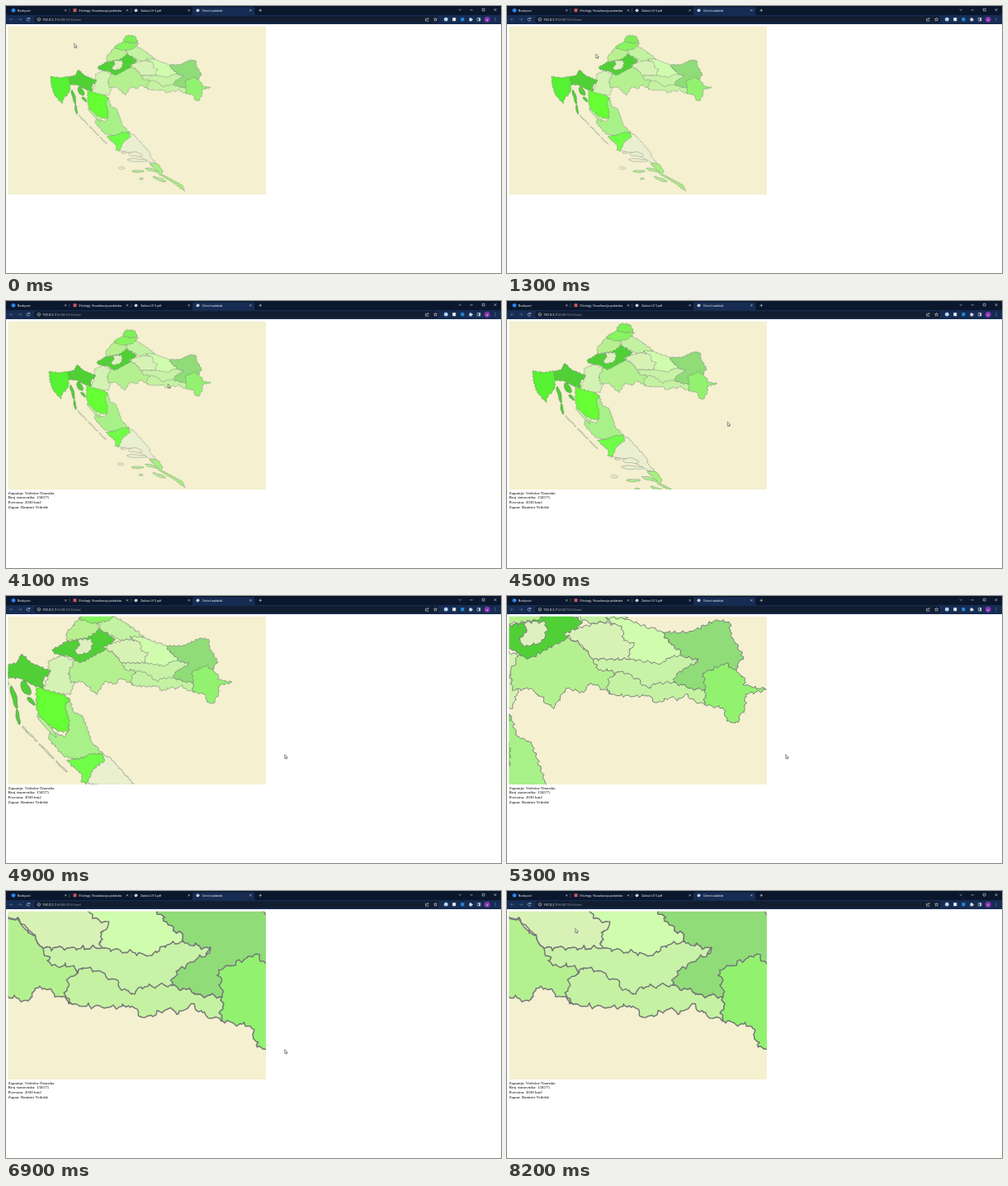
Write an HTML page that moves like this. It is 600 px wide and 323 px high and loops after 8300 ms.

```html
<!DOCTYPE html>
<html lang="hr">
<head>
<meta charset="utf-8">
<title>Cetvrti zadatak</title>
<style>
  html, body { margin: 0; width: 100%; height: 100%; overflow: hidden; background: #fff; }
  svg { display: block; width: 100%; height: 100%; }
  .ui { font: 3.65px Roboto, "Open Sans", sans-serif; fill: #eef2f8; }
  .page { font: 5px "Liberation Serif", Times, serif; fill: #000; }
  .icon { fill: none; stroke: #d5dbe6; stroke-width: .6; }
  .dim { opacity: .4; }
</style>
</head>
<body>
<svg viewBox="0 0 600 323" preserveAspectRatio="none">
  <defs><clipPath id="frame"><rect x="2.5" y="24.8" width="312.5" height="203.2"/></clipPath></defs>
  <rect width="600" height="323" fill="#fff"/>
  <rect x="2.5" y="24.8" width="312.5" height="203.2" fill="#f4f0d0"/>
  <g clip-path="url(#frame)">
    <g id="map" stroke="#757778" stroke-width=".37" stroke-linejoin="round"></g>
  </g>
  <g id="info" class="page"></g>
  <g id="chrome"></g>
  <path id="cursor" d="M0 0V4.9L1.15 3.9L1.9 5.6L2.7 5.25L1.95 3.6H3.5Z" fill="#fff" stroke="#222" stroke-width=".5"/>
</svg>
<script>
const LOOP = 8300, ZOOM_START = 3800, ZOOM_TIME = 3000, CLICK = 3700;
const FIX = [203.8, 89];   // point that stays put while the map grows
const $ = id => document.getElementById(id);
const { sin, cos, PI, hypot, max, min, ceil } = Math;

// Key corners of each region, back to front; the wobble below adds the winding borders.
const regions = [
  ["#a8f088", "120,109 124,111 127,121 134,124 141,144 150,153 141,154 130,157 120,155 108,141 110,136 120,140 124,135 120,125"],
  ["#66ff33", "99,103 107,101 119,108 124,111 121,117 124,128 123,136 116,136 102,127 99,118"],
  ["#e9efcf", "150,153 157,158 174,177 175,182 184,193 172,188 156,178 142,176 136,174 140,160"],
  ["#70ff48", "122,158 135,156 140,153 149,153 151,158 142,165 137,176 133,174 134,169"],
  ["#a8f080", "174,190 184,191 190,199 188,203 214,217 217,224 203,214 186,204 181,198"],
  ["#d4f2b4", "108,83 119,78 131,84 123,92 128,98 125,108 116,107 104,104 109,92"],
  ["#50d036", "75,86 84,84 88,77 95,84 110,90 104,97 104,103 97,101 88,96 78,95"],
  ["#55f132", "54,85 66,87 76,85 78,95 77,104 70,112 68,118 59,108 55,96"],
  ["#b4f090", "124,90 128,82 150,73 157,76 164,84 174,88 173,101 163,95.5 159.5,100 151,98 145,108 134,98 125,99"],
  ["#50d036", "111,74 121,68 133,66 147,58 159,66 150,75 132,84 124,79 113,77"],
  ["#dff0c0", "131,66 141,66 142,70 139,76 131,78 128,74 132,71"],
  ["#b8f090", "122,67 122,61 131,51 146,51 146,59 138,65"],
  ["#c2f2a2", "146,51 158,48 166,53 181,64 163,67 148,59"],
  ["#88f460", "131,50 143,42 152,45 161,45 154,52 141,54"],
  ["#7df058", "143,39 148,35 157,37 160,44 152,45 143,43"],
  ["#d0fcae", "170,64 178,64 198,71 202,77 206.5,80 207,82.5 197,87 182,85 177,69"],
  ["#d8f2b6", "150,72 157,69 168,66 178,68 179,75 184,76 181.5,80.5 182,84 172,84 164,84 158.5,77"],
  ["#c8f2a8", "164,84 172,84 182,84 197,86.3 200.5,83.5 206,82 214.5,84 214,88 203,97 190,99 174,92 173.5,89.3 166.7,89.3"],
  ["#c5f2a2", "172,93 176,90 181.5,91 191,98 195,95.7 203,95.2 211,98 218.4,98.7 218,106 212.4,103.5 209,100.8 205.2,103.8 201.7,102.5 195,105 190,101.4 183.4,102 173,101 170.7,98"],
  ["#90dc78", "198,71 210,71 224,65 230,66 231,73 237,83 231,92 218.4,98.7 211,98 203,95.2 204.4,91 214.5,85.5 214.5,84 207,82.5 206.5,80 202,77"],
  ["#92f270", "218.4,98.7 217.3,90.6 228.6,85.8 231,88 237.5,93 237,96.5 248,98.5 238,101 237.5,108 234,114.6 229,114 227,107.6 218,106"]
];

// Islands: fill, centre, length, width, heading in degrees
const islands = [
  ["#50d036", 91, 103, 12, 6, 60], ["#50d036", 82, 110, 18, 3.5, 75], ["#50d036", 85, 125, 12, 2.5, 80], ["#50d036", 95, 113, 8, 3, 45],
  ["#b4f096", 107, 132, 22, 3, 48],
  ["#e9efcf", 143, 177.5, 6, 2, 0], ["#e9efcf", 157, 179.5, 17, 5, 5], ["#e9efcf", 159, 186.5, 24, 3.5, 3], ["#e9efcf", 140, 196, 7, 3, 5],
  ["#b2ee90", 160, 200, 15, 2.5, 0], ["#b2ee90", 177, 198.5, 17, 3, 15], ["#b2ee90", 164, 209, 5, 2, 0], ["#b2ee90", 186, 209.5, 17, 3, 20]
];
for (let i = 0; i < 8; i++) islands.push(["#e4f2c0", 90 + 4.2 * i, 134 + 4.3 * i, 5 + 3 * sin(2 * i), 1.1, 44 + 6 * cos(3 * i)]);

const wobble = (x, y) => [
  .55 * sin(1.7 * y + .6 * x) + .3 * sin(3.7 * y - 1.9 * x),
  .55 * sin(1.8 * x - .5 * y) + .3 * sin(3.9 * x + 1.6 * y)
];

// Splits an edge into short steps; the ends stay put so neighbours meet.
function windingEdge([x0, y0], [x1, y1]) {
  const n = ceil(hypot(x1 - x0, y1 - y0) / .7);
  return Array.from({ length: n }, (_, i) => {
    const u = i / n, x = x0 + (x1 - x0) * u, y = y0 + (y1 - y0) * u;
    const [dx, dy] = wobble(x, y), fade = min(1, 1.6 * sin(PI * u));
    return [x + dx * fade, y + dy * fade];
  });
}
const shape = (fill, pts) => `<path fill="${fill}" d="M${pts.map(p => p.map(v => v.toFixed(2))).join("L")}Z"/>`;

function region([fill, text]) {
  const keys = text.split(" ").map(p => p.split(",").map(Number));
  return shape(fill, keys.flatMap((p, i) => windingEdge(p, keys[(i + 1) % keys.length])));
}
function island([fill, x, y, length, width, heading]) {
  const h = heading * PI / 180;
  return shape(fill, Array.from({ length: 24 }, (_, i) => {
    const a = i * PI / 12, r = 1 + .18 * sin(3 * a + x) + .1 * sin(5 * a + y);
    const u = length / 2 * cos(a), v = width / 2 * sin(a) * r;
    return [x + u * cos(h) - v * sin(h), y + u * sin(h) + v * cos(h)];
  }));
}
$("map").innerHTML = regions.map(region).join("") + islands.map(island).join("");

$("info").innerHTML = ["Zupanija: Vedrsko-Tisanska", "Broj stanovnika: 158575", "Povrsina: 2030 km2", "Zupan: Ranimir Vedošić"]
  .map((line, i) => `<text x="2.5" y="${233.7 + i * 5.65}">${line}</text>`).join("");

// Browser bars
const rect = (x, y, w, h, fill, r = 0) => `<rect x="${x}" y="${y}" width="${w}" height="${h}" rx="${r}" fill="${fill}"/>`;
const dot = (x, y, r, fill) => `<circle cx="${x}" cy="${y}" r="${r}" fill="${fill}"/>`;
const icon = (d, more = "") => `<path class="icon ${more}" d="${d}"/>`;
const label = (x, y, text, more = "") => `<text class="ui" x="${x}" y="${y}" ${more}>${text}</text>`;
const cross = (x, y, r) => icon(`M${x - r} ${y - r}l${2 * r} ${2 * r}m0 ${-2 * r}l${-2 * r} ${2 * r}`);
const globe = x => dot(x, 5.3, 1.9, "#dfe4ec") + `<path d="M${x - 1.2} 4.5l1.2 .8l.9 1.2" stroke="#33425f" stroke-width=".5" fill="none"/>`;

const TAB = 74.7, LIGHT = "#d5dbe6", BAR = "#162c52";
const titles = ["Nookpost", "E-kolegij: Visualizacija podataka", "Zadaci LV 5.pdf", "Cetvrti zadatak"];

$("chrome").innerHTML =
  rect(0, 0, 600, 11.5, "#0a172c") + rect(0, 11, 600, 11, BAR) +
  rect(226, 1.2, 75.5, 12, BAR, 2) + rect(34, 12.2, 491, 8.2, "#121d30", 4) +
  dot(9, 5.3, 2.4, "#2b86f0") + rect(81.5, 3.2, 4, 4, "#c9585c") + globe(157.5) + globe(232.5) +
  titles.map((text, i) => label(13.8 + TAB * i, 6.6, text) + cross(72.3 + TAB * i, 5.3, 1.1)).join("") +
  icon("M77 3v5M151.7 3v5", "dim") +
  icon("M306.5 5.3h3.6m-1.8-1.8v3.6M548.7 4l1.5 1.4l1.5-1.4M562.5 4.8h3.2M577.3 3.2h2.8v2.8h-2.8z") + cross(593, 4.6, 1.4) +
  icon("M8.5 16.3h-4m1.6-1.6l-1.6 1.6l1.6 1.6", "dim") + icon("M14.8 16.3h4m-1.6-1.6l1.6 1.6l-1.6 1.6", "dim") +
  icon("M28.4 15.2a1.8 1.8 0 1 0 .3 1.8M28.8 14v1.6h-1.6") +
  icon("M38.1 16.3a1.8 1.8 0 1 0 3.6 0a1.8 1.8 0 1 0-3.6 0M39.9 16v1.3") +
  label(44, 17.8, '192.0.2.7<tspan fill="#8c98ac">:6600/V2-6.html</tspan>', 'style="font-size:4.1px"') +
  icon("M509.8 15.2h-1.2v3h3.4v-1M509.8 17q.3-2 2.4-2m-.9-.9l.9.9l-.9.9") +
  icon("M520.6 14.2l.6 1.4l1.5.1l-1.1 1l.3 1.5l-1.3-.8l-1.3.8l.3-1.5l-1.1-1l1.5-.1z") +
  dot(533.3, 16.2, 2.4, "#b9d3f5") + rect(541.2, 14.2, 4, 4, "#e4e8ee") + rect(551.3, 14.2, 4, 4, "#2489d8") +
  rect(561.5, 15, 3.3, 3.3, LIGHT) + dot(563, 14.7, .8, LIGHT) + dot(565.1, 16.5, .8, LIGHT) +
  icon("M571.3 14.5h3.5v3.5h-3.5z") + rect(573.2, 14.5, 1.6, 3.5, LIGHT) +
  dot(583.2, 16.3, 3.4, "#8e35b4") + label(583.2, 17.5, "a", 'text-anchor="middle"') +
  [14.7, 16.3, 17.9].map(y => dot(593, y, .45, LIGHT)).join("");

// Pointer moves: start, end, target
const HOME = [82.8, 45.5];
const moves = [[1000, 2000, 198, 103.5], [2900, 3200, 196.3, 100.4], [4200, 4800, 337.8, 191.7], [7250, 8100, ...HOME]];
const clamp = v => min(1, max(0, v));
const cubicInOut = v => v < .5 ? 4 * v ** 3 : 1 - 4 * (1 - v) ** 3;

function pointerAt(t) {
  return moves.reduce(([x, y], [from, to, tx, ty]) => {
    const u = clamp((t - from) / (to - from)), e = u * u * (3 - 2 * u);
    return [x + (tx - x) * e, y + (ty - y) * e];
  }, HOME);
}

function draw(t) {
  const k = 1 + 3 * cubicInOut(clamp((t - ZOOM_START) / ZOOM_TIME));
  $("map").setAttribute("transform", `translate(${FIX[0] * (1 - k)} ${FIX[1] * (1 - k)}) scale(${k})`);
  $("info").setAttribute("visibility", t >= CLICK ? "visible" : "hidden");
  $("cursor").setAttribute("transform", `translate(${pointerAt(t).join(" ")})`);
}

const begin = performance.now();
function tick() {
  draw((performance.now() - begin) % LOOP);
  requestAnimationFrame(tick);
}
tick();
</script>
</body>
</html>
```
